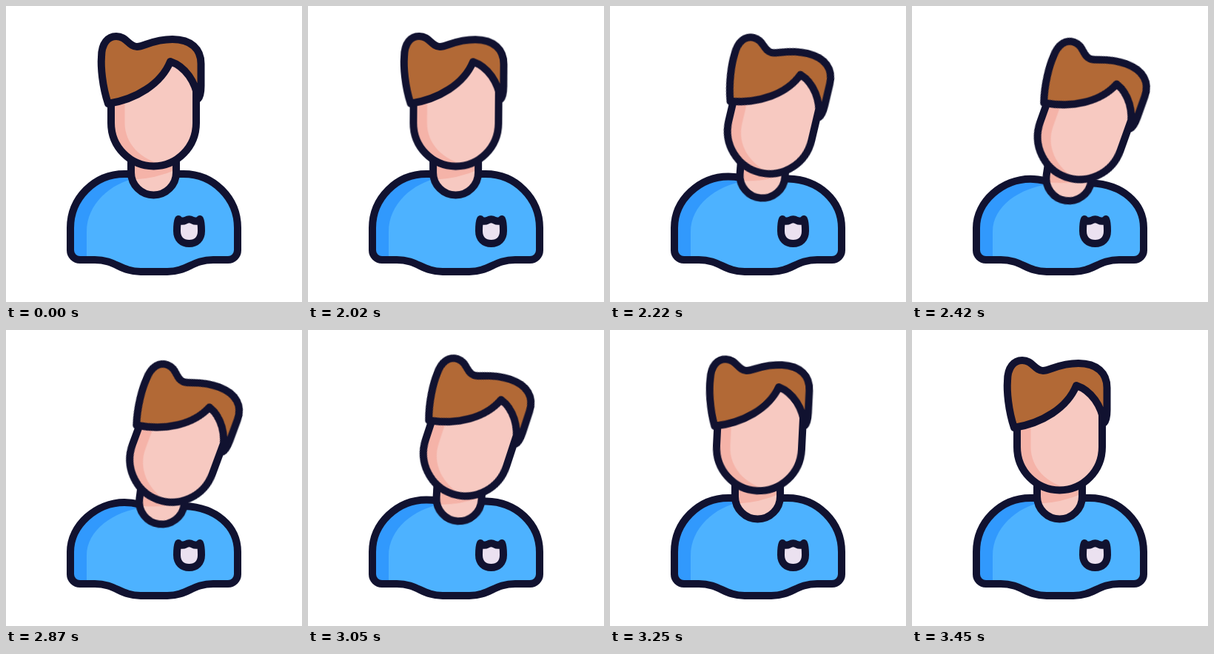
These frames come from a looping animation (400x400 px, 3470 ms). An HTML page:

```html
<!DOCTYPE html>
<html lang="en">
<head>
<meta charset="utf-8">
<title>Head tilt</title>
<style>
  html, body { margin: 0; width: 100%; height: 100%; overflow: hidden; background: #fff; }
  svg { display: block; width: 100vw; height: 100vh; }
  .line { fill: none; stroke: #111230; stroke-width: 10; stroke-linecap: round; stroke-linejoin: round; }
  .skin { fill: #f7c9c1; }
  .skin-shade { fill: #f5b3a8; }
  .line.badge { fill: #ebe1f0; }
  .line.hair { fill: #b26936; }
  #neck { transform-origin: 199.5px 225px; }
  #tilt { transform-origin: 181px 198px; }
</style>
</head>
<body>
<svg viewBox="0 0 400 400">
  <path id="shirt" fill="#3199fd"/>
  <path id="shirtLight" fill="#4db2ff"/>
  <path id="shirtLine" class="line"/>

  <path class="line badge" d="M233 288C236 291.500 240 291 243 289.500Q247.500 287 252 289.500C255 291 259 291.500 262 288Q264 292 264 304C264 315 257 321 247.500 321C238 321 231 315 231 304Q231 292 233 288Z"/>

  <g id="neck">
    <path class="skin" d="M169 200V225A30.500 30.500 0 0 0 230 225V200Z"/>
    <path class="skin-shade" d="M169 200V235Q204 233 230 221V200Z"/>
    <path class="line" d="M169 205V225A30.500 30.500 0 0 0 230 225V205"/>
  </g>

  <g id="shift">
    <g id="tilt">
      <path class="skin-shade" d="M142 78V158A57.500 58.500 0 0 0 257 158V78Z"/>
      <path class="skin" d="M160.500 78V158C160.500 186 182 208 214 215A57.500 58.500 0 0 0 257 158V78Z"/>
      <path class="line" d="M142 128V158A57.500 58.500 0 0 0 257 158V115"/>
      <path class="line hair" d="M138 132C130 108 128 82 129 69C129 50 138 41 149 41C163 41 166 55 177 55C187 55 198 45 225 45C250 45 263.500 58 263.500 78V108C263.500 118 262 123 259.500 125.500C256 103 243 82 222 75C210 105 176 126 138 132Z"/>
    </g>
  </g>
</svg>
<script>
  const LOOP = 3470;
  const SWING = 'cubic-bezier(.2,.17,.4,1)';
  const GLIDE = 'cubic-bezier(.33,.1,.5,1)';
  const SMOOTH = 'cubic-bezier(.33,0,.67,1)';
  const STRONG = 'cubic-bezier(.67,0,.33,1)';
  const el = id => document.getElementById(id);

  // Shirt outline; k = 0 upright, k = 1 collar pulled down by the lean.
  const hem = 'H120C148 343 155 359 182 359H218C245 359 252 343 280 343H300A13 13 0 0 0 313 330V300';
  const mix = (a, b, k) => a + (b - a) * k;
  function shirt(k) {
    const y = mix(227, 234, k), join = mix(227, 237, k), right = mix(227, 240, k);
    const shoulder = `C313 ${mix(259.7, 266, k)} ${mix(280.3, 284, k)} ${mix(227, 242, k)} ${mix(240, 242, k)} ${right}`;
    return {
      full: `M100 343${hem}${shoulder}L${mix(172, 182, k)} ${join}` +
        `C${mix(168, 174, k)} ${mix(227, 235, k)} ${mix(164, 167, k)} ${y} 160 ${y}` +
        `C${mix(119.7, 123, k)} ${y} 87 ${mix(259.7, 264, k)} 87 300V330A13 13 0 0 0 100 343Z`,
      light: `M109 343${hem}${shoulder}L${mix(178, 188, k)} ${mix(232, 241, k)}` +
        `C${mix(141, 145, k)} ${mix(239, 246, k)} 109 ${mix(268, 271, k)} 109 305Z`
    };
  }

  // stops: [time in ms, value, easing towards the next stop]
  function run(id, prop, stops) {
    const frames = stops.map(([t, value, easing = 'linear']) => ({ offset: t / LOOP, [prop]: value, easing }));
    const anim = el(id).animate(frames, { duration: LOOP, iterations: Infinity });
    anim.startTime = document.timeline.currentTime;
  }

  // Rest, lean out, hold, lean back, rest.
  const lean = (rest, out) =>
    [[0, rest], [2010, rest, GLIDE], [2520, out], [2750, out, SMOOTH], [3250, rest], [LOOP, rest]];

  const rest = shirt(0), bent = shirt(1);
  const parts = { shirt: 'full', shirtLight: 'light', shirtLine: 'full' };
  for (const [id, key] of Object.entries(parts)) {
    el(id).setAttribute('d', rest[key]);
    run(id, 'd', lean(`path("${rest[key]}")`, `path("${bent[key]}")`));
  }

  const move = (x, y) => `translate(${x}px, ${y}px)`;
  const turn = a => `rotate(${a}deg)`;

  run('neck', 'transform', lean(`${move(0, 0)} ${turn(0)}`, `${move(13, 8.3)} ${turn(9)}`));

  run('shift', 'transform', [
    [0, move(0, 0)], [2010, move(0, 0), GLIDE], [2520, move(16.3, 10)], [2750, move(16.3, 10), SMOOTH],
    [3150, move(0, -1.5), SMOOTH], [3270, move(0, 0)], [LOOP, move(0, 0)]
  ]);

  run('tilt', 'transform', [
    [0, turn(0)], [2010, turn(0), SWING], [2520, turn(20.3)], [2890, turn(20.3), STRONG],
    [3430, turn(0)], [LOOP, turn(0)]
  ]);
</script>
</body>
</html>
```
